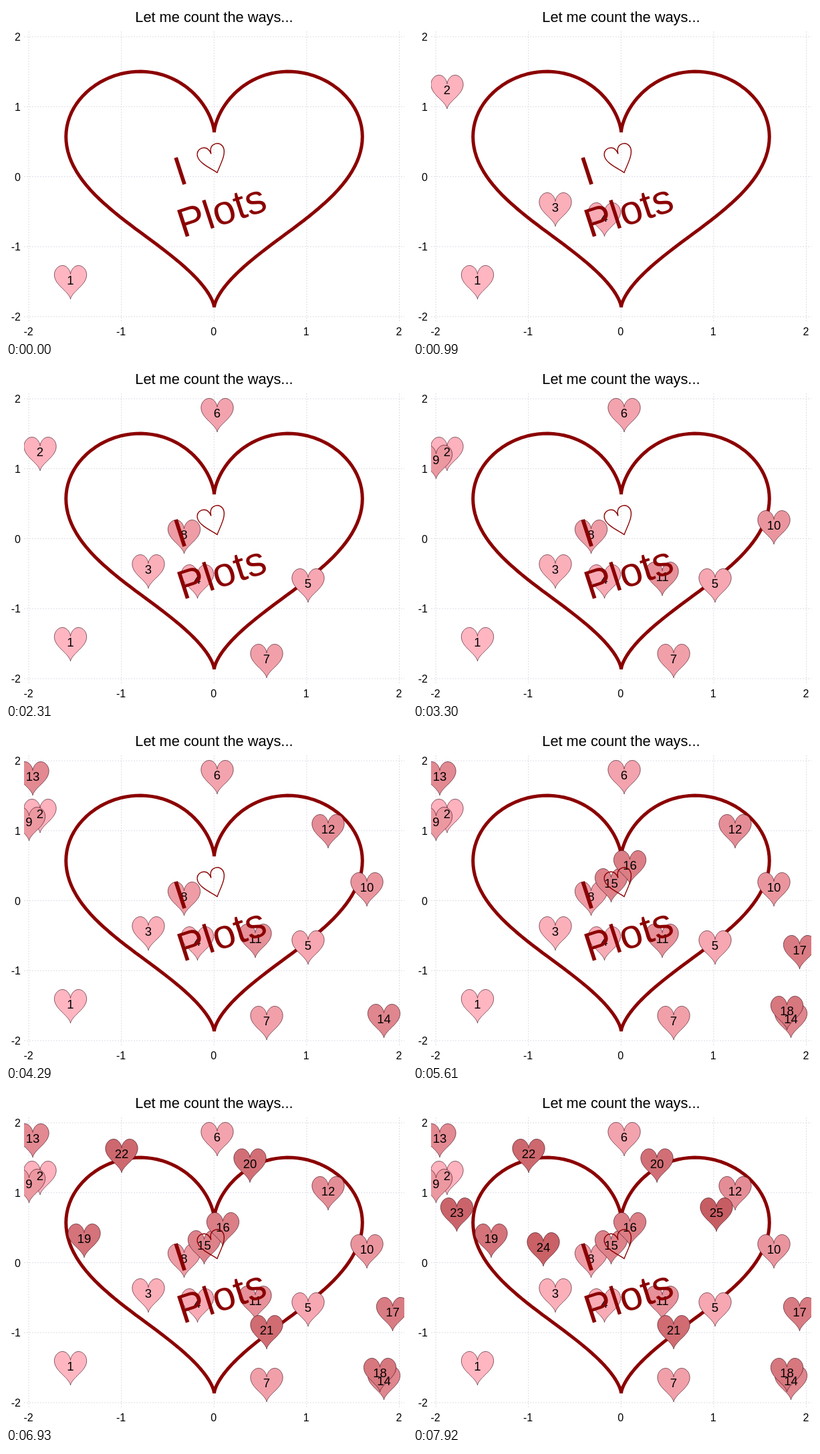
These frames come from a looping animation (600x500 px, 8000 ms). An HTML page:

```html
<!DOCTYPE html>
<html lang="en">
<head>
<meta charset="utf-8">
<title>Let me count the ways...</title>
<style>
  html, body { margin: 0; width: 100%; height: 100%; overflow: hidden; background: #fff; }
  svg { display: block; width: 600px; height: 500px; }
  text { font-family: "Liberation Sans", Arial, sans-serif; }
  .grid { stroke: #dcdce8; stroke-width: 1; stroke-dasharray: 2 2; }
  .tick { font-size: 16px; }
  .count { font-size: 18.5px; text-anchor: middle; }
  .mark { stroke: #300010; stroke-opacity: .65; stroke-width: .9; }
  .love { font-size: 61px; fill: #8b0000; }
</style>
</head>
<body>
<svg viewBox="0 0 600 500" xmlns="http://www.w3.org/2000/svg">
  <defs><clipPath id="area"><rect x="27" y="38" width="569" height="434"/></clipPath></defs>
  <rect width="600" height="500" fill="#fff"/>
  <g id="axes"></g>
  <text x="311.4" y="24" font-size="21.8" text-anchor="middle">Let me count the ways...</text>
  <path id="outline" fill="none" stroke="#8b0000" stroke-width="5" stroke-linejoin="bevel"/>
  <g id="marks" clip-path="url(#area)"></g>
  <g id="counts"></g>
  <text class="love" transform="translate(258.9 269.4) rotate(-18)">I</text>
  <text class="love" transform="translate(264.2 347.3) rotate(-18)">Plots</text>
  <path transform="translate(316 249.5) rotate(-18)" fill="none" stroke="#8b0000" stroke-width="1.4"
    d="M0 0C-7-9-20.5-21-20.5-31.5C-20.5-38-16-42-11-42C-5-42-.5-38 0-29.5C.5-38 5-42 11-42C16-42 20.5-38 20.5-31.5C20.5-21 7-9 0 0Z"/>
</svg>
<script>
const LOOP = 8000, STEP = 330, TOTAL = 50;
const PINK = [255, 182, 193], RED = [139, 0, 0];
const SPOTS = [
  [96.5, 411], [51, 126], [213, 302], [286.5, 317], [452, 323],
  [316, 68], [390, 436], [266.5, 250], [34.5, 138], [540, 236],
  [373, 313], [482, 149], [40, 70], [565.5, 433], [296.5, 230],
  [324.5, 203], [578.5, 330], [559.5, 421], [117, 220], [365, 107.5],
  [390, 357], [173, 93], [65.5, 181], [195, 233], [454, 181]
];
const $ = id => document.getElementById(id);

function add(parent, tag, attrs, text) {
  const el = document.createElementNS("http://www.w3.org/2000/svg", tag);
  for (const k in attrs) el.setAttribute(k, attrs[k]);
  if (text !== undefined) el.textContent = text;
  return parent.appendChild(el);
}

function heart(cx, cy, sx, sy, steps) {
  const pts = [];
  for (let i = 0; i < steps; i++) {
    const t = 2 * Math.PI * i / steps, c = Math.cos(t), s = Math.sin(t);
    const x = 1.6 * s ** 3;
    const y = .1137 * (13 * c - 5 * Math.cos(2 * t) - 2 * Math.cos(3 * t) - Math.cos(4 * t))
      + .066 + .05 * (s * (1 + c)) ** 2;
    pts.push((cx + sx * x).toFixed(2) + " " + (cy - sy * y).toFixed(2));
  }
  return "M" + pts.join("L") + "Z";
}

const shade = f => `rgb(${PINK.map((p, i) => Math.round(p + (RED[i] - p) * f))})`;

for (let v = -2; v <= 2; v++) {
  const x = 311.3 + 138.6 * v, y = 255.5 - 104.75 * v;
  add($("axes"), "line", { class: "grid", x1: x, x2: x, y1: 38, y2: 472 });
  add($("axes"), "line", { class: "grid", x1: 27, x2: 596, y1: y, y2: y });
  add($("axes"), "text", { class: "tick", x: x - .6, y: 493, "text-anchor": "middle" }, v);
  add($("axes"), "text", { class: "tick", x: 22, y: y + 6, "text-anchor": "end" }, v);
}
$("outline").setAttribute("d", heart(311.5, 255.5, 138.6, 104.75, 200));

const items = SPOTS.map(([x, y], i) => [
  add($("marks"), "path", { class: "mark", d: heart(x, y, 15.1, 15, 80), fill: shade(i / (TOTAL - 1)) }),
  add($("counts"), "text", { class: "count", x, y: y + 6.3 }, i + 1)
]);

function draw(ms) {
  const shown = Math.floor((ms % LOOP) / STEP) + 1;
  items.forEach((pair, i) => pair.forEach(el => el.style.display = i < shown ? "" : "none"));
}

function tick(now) {
  draw(now);
  requestAnimationFrame(tick);
}
draw(0);
requestAnimationFrame(tick);
</script>
</body>
</html>
```
